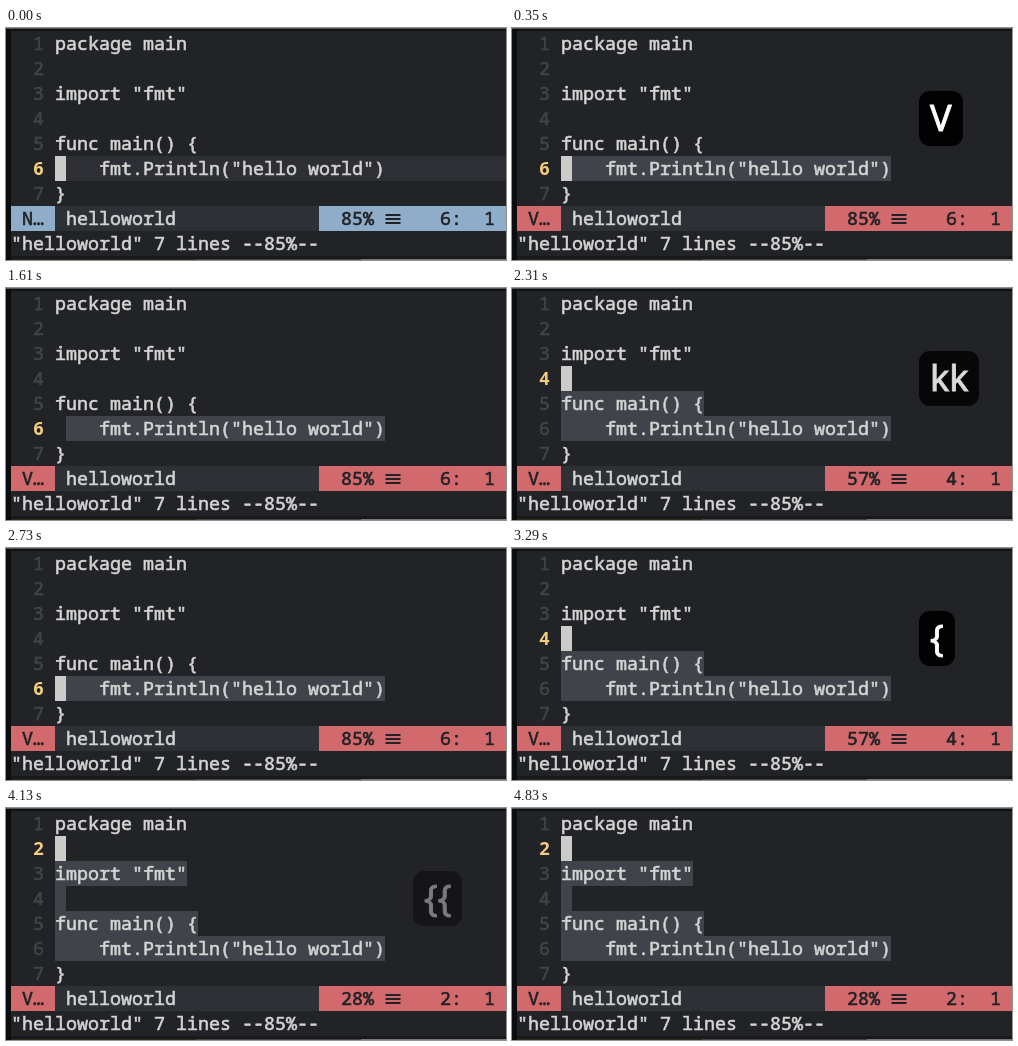
Animation of 500 by 232 pixels, one loop 4.9 s. Source, as an HTML page:

```html
<!DOCTYPE html>
<html lang="en">
<head>
<meta charset="utf-8">
<title>Visual line selection</title>
<style>
  html, body { margin: 0; width: 100%; height: 100%; overflow: hidden; background: #222326; }
  #stage { position: absolute; left: 0; top: 0; width: 500px; height: 232px; overflow: hidden; }
  svg { display: block; }
  text {
    font: 18.333px "Noto Sans Mono", monospace; font-variant-ligatures: none; white-space: pre;
    fill: currentColor; stroke: currentColor; stroke-width: .6px;
  }
  text.active { font-weight: 700; stroke: none; }
  #key {
    position: absolute; left: 407px; top: 63px; height: 55px; padding: 0 11px;
    border-radius: 11px; background: #020203; color: #fff;
    font: 36px/53px "Noto Sans", sans-serif; white-space: pre;
    -webkit-text-stroke: .9px #fff;
  }
</style>
</head>
<body>
<div id="stage">
  <svg id="screen" width="500" height="232" viewBox="0 0 500 232"></svg>
  <div id="key"></div>
</div>
<script>
const LOOP = 4900, TICK = 70;
const CELL = 11, ROW = 25, LEFT = 5, TOP = 3, CODE = 49, ANCHOR = 6;
const RED = '#d26a6d', BLUE = '#8fadc8', INK = '#202226', TEXT = '#d3d4d3';
const DIM = '#414449', GOLD = '#f3cc80';

const lines = [
  'package main', '', 'import "fmt"', '',
  'func main() {', '    fmt.Println("hello world")', '}'
];

// time, mode, cursor line, cursor shown
const states = [
  [0, 'N', 6, true],
  [350, 'V', 6, true],
  [1610, 'V', 6, false],
  [1890, 'V', 5, true],
  [2100, 'V', 4, true],
  [2730, 'V', 6, true],
  [3290, 'V', 4, true],
  [3570, 'V', 2, true]
];

// label, shown from, fade start, gone
const keys = [
  ['V', 70, 770, 1120],
  ['k', 1680, 2030, 2030],
  ['kk', 2030, 2310, 2660],
  ['{', 3150, 3430, 3430],
  ['{{', 3430, 3990, 4270]
];

const screen = document.getElementById('screen');
const keyBox = document.getElementById('key');

function add(tag, attrs, content = '') {
  const el = document.createElementNS('http://www.w3.org/2000/svg', tag);
  for (const name in attrs) el.setAttribute(name, attrs[name]);
  el.textContent = content;
  screen.append(el);
  return el;
}
const rowTop = row => TOP + (row - 1) * ROW;
const rect = (x, y, width, height, fill) => add('rect', { x, y, width, height, fill });
const label = (x, row, content, color) => add('text', { x, y: rowTop(row) + 18.7, color }, content);
const show = (el, on) => el.setAttribute('visibility', on ? 'visible' : 'hidden');

// window and its edges
rect(0, 0, 500, 232, '#222326');
rect(0, 0, 500, 1, '#55575a');
rect(0, 1, 500, 2, '#101113');
rect(0, 1, LEFT, 231, '#0c0d0e');
rect(LEFT, 228, 495, 3, '#18191a');
rect(LEFT, 231, 185, 1, '#2b2c1e');
rect(190, 231, 165, 1, '#474442');
rect(355, 231, 145, 1, '#7c7876');

// editor rows
const cursorLine = rect(CODE, rowTop(6), 500 - CODE, ROW, '#2d2f34');
const marks = lines.map((code, i) =>
  rect(CODE, rowTop(i + 1), Math.max(1, code.length) * CELL, ROW, '#40444a'));
const numbers = lines.map((code, i) => {
  label(CODE, i + 1, code, TEXT);
  return label(LEFT + 2 * CELL, i + 1, i + 1, DIM);
});
const gap = rect(CODE, 0, CELL, ROW, '#222326');
const cursor = rect(CODE, 0, CELL, ROW, '#cbcbca');

// status bar
const barY = rowTop(8);
rect(CODE, barY, 264, ROW, '#2d3035');
const tabs = [rect(LEFT, barY, 44, ROW), rect(313, barY, 187, ROW)];
const modeText = label(16, 8, '', INK);
label(60, 8, 'helloworld', TEXT);
const percent = label(335, 8, '', INK);
for (let i = 0; i < 3; i++) rect(379.5, barY + 8 + i * 4, 15, 2, INK);
const place = label(434, 8, '', INK);
label(LEFT, 9, '"helloworld" 7 lines --85%--', TEXT);

function render(t) {
  const [, mode, line, blinkOn] = states.filter(s => s[0] <= t).pop();
  const visual = mode === 'V';

  show(cursorLine, !visual);
  marks.forEach((mark, i) => show(mark, visual && i + 1 >= line && i + 1 <= ANCHOR));
  numbers.forEach((number, i) => {
    const active = i + 1 === line;
    number.setAttribute('color', active ? GOLD : DIM);
    number.classList.toggle('active', active);
  });
  for (const el of [gap, cursor]) el.setAttribute('y', rowTop(line));
  show(gap, !blinkOn);
  show(cursor, blinkOn);

  for (const tab of tabs) tab.setAttribute('fill', visual ? RED : BLUE);
  modeText.textContent = mode + '…';
  percent.textContent = Math.floor(line / lines.length * 100) + '%';
  place.textContent = line + ':  1';

  const key = keys.find(k => t >= k[1] && t < k[3]);
  keyBox.style.visibility = key ? 'visible' : 'hidden';
  if (key) {
    const [name, , fade, end] = key;
    keyBox.textContent = name;
    keyBox.style.opacity = t < fade ? 1 : (end - t) / (end - fade + TICK);
  }
}

const start = performance.now();
let last = -1;
function tick(now) {
  const t = Math.floor(Math.max(0, now - start) % LOOP / TICK) * TICK;
  if (t !== last) render(last = t);
  requestAnimationFrame(tick);
}
render(0);
requestAnimationFrame(tick);
</script>
</body>
</html>
```
